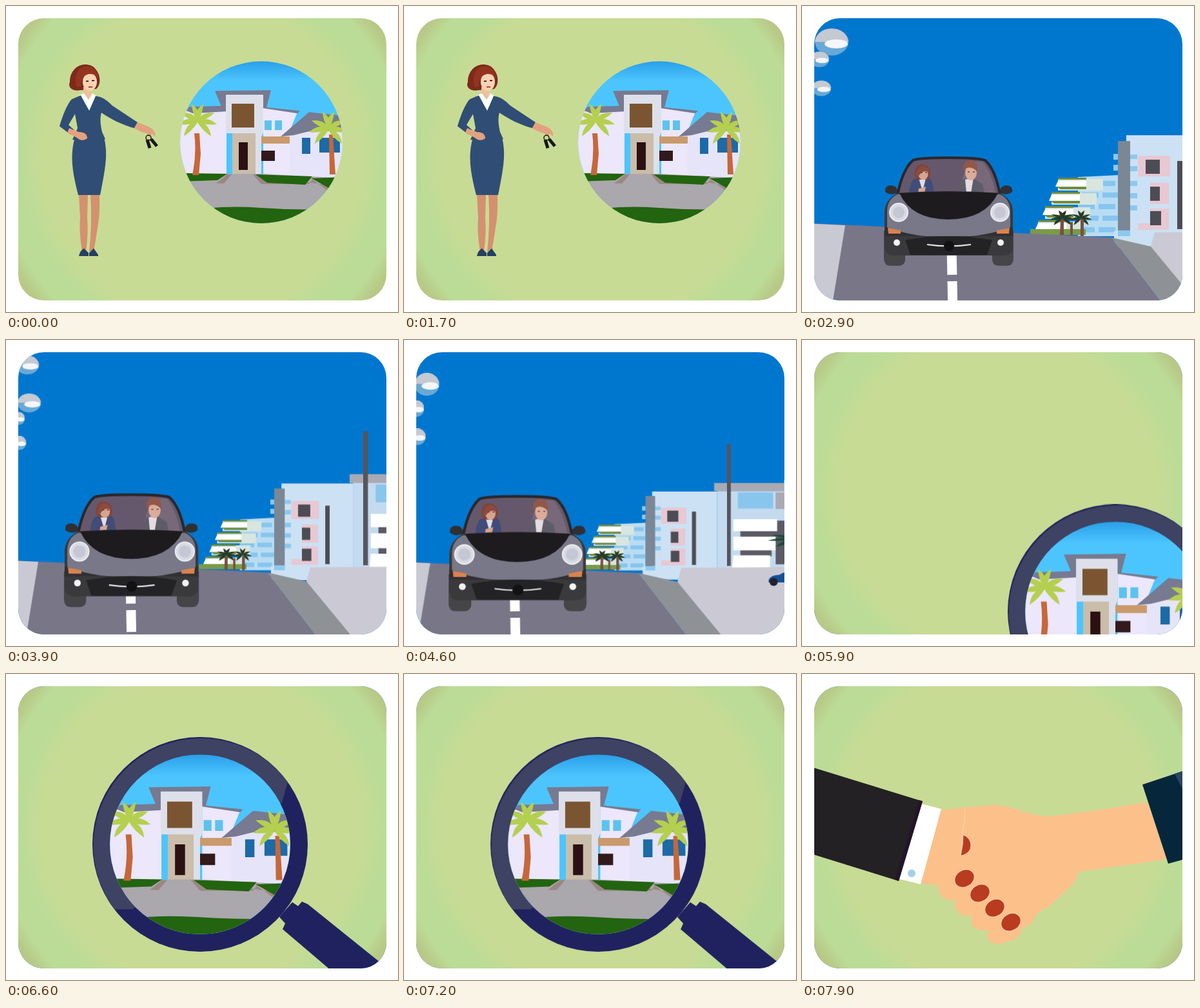
An HTML page that plays this animation: 608 px wide and 476 px high, repeating every 8 s.

```html
<!DOCTYPE html>
<html lang="en">
<head>
<meta charset="utf-8">
<title>House hunting</title>
<style>
html, body { margin: 0; width: 100%; height: 100%; overflow: hidden; background: #fff; }
.stage { position: absolute; left: 0; top: 0; width: 608px; height: 476px; clip-path: inset(19px 18px 18px 19px round 40px); }
.scene, svg { position: absolute; left: 0; top: 0; width: 608px; height: 476px; }
.green { background: radial-gradient(circle 370px at 304px 238px, #c8db94 0 66%, #bbdc97 76% 85%, #b9c987 91%, #b6c083); }
.blue { background: #0077cf; }
.white { background: #fff; }

/* every moving part shares one 8 s clock */
.scene, .move { animation: 8s linear infinite; }
.w1 { animation-name: w1; }
.drive { animation-name: drive; }
.w2 { animation-name: w2; }
.deal { animation-name: deal; }
.car { animation-name: car; }
.city { animation-name: city; }
.road { animation-name: road; }
.lane { animation-name: lane; }
.dash { animation-name: dash; }
.l1 { animation-name: l1; }
.l2 { animation-name: l2; }
.l3 { animation-name: l3; }
.l4 { animation-name: l4; }
.l5 { animation-name: l5; }
.lens { animation-name: lens; }
.left { animation-name: left; }
.right { animation-name: right; }

/* iris wipes: a white disc, then the next scene inside it */
.w1, .w2, .drive, .deal { --in: cubic-bezier(.333, 0, .667, .333); }
@keyframes w1 {
  0%, 25.875% { clip-path: circle(0 at 303px 237px); animation-timing-function: var(--in); }
  32.02%, 100% { clip-path: circle(370px at 303px 237px); }
}
@keyframes drive {
  0%, 27.125% { clip-path: circle(0 at 303px 237px); animation-timing-function: cubic-bezier(.333, 0, .667, .333); }
  33.27%, 100% { clip-path: circle(370px at 303px 237px); }
}
@keyframes w2 {
  0%, 63.375% { clip-path: circle(0 at 303px 237px); animation-timing-function: cubic-bezier(.333, 0, .667, .333); }
  69.52%, 100% { clip-path: circle(370px at 303px 237px); }
}
@keyframes deal {
  0%, 64.625% { clip-path: circle(0 at 303px 237px); animation-timing-function: cubic-bezier(.333, 0, .667, .333); }
  70.77%, 100% { clip-path: circle(370px at 303px 237px); }
}

/* the drive slows down along one shared curve */
@keyframes car {
  0%, 25.875% { transform: translate(260.4px, 230.5px) scale(.958); animation-timing-function: cubic-bezier(.333, .496, .667, .829); }
  71.25%, 100% { transform: translate(154.4px, 244.9px) scale(1.091); }
}
@keyframes city {
  0%, 25.875% { transform: translate(564.8px, 376px) scale(1.1415); animation-timing-function: cubic-bezier(.333, .496, .667, .829); }
  71.25%, 100% { transform: translate(327.2px, 369.6px) scale(.692); }
}
@keyframes road {
  0%, 25.875% { transform: translate(75.8px, -1.5px); animation-timing-function: cubic-bezier(.333, .496, .667, .829); }
  71.25%, 100% { transform: translate(-165px, 3.3px); }
}
@keyframes lane {
  0%, 25.875% { transform: translate(39.4px, 0); animation-timing-function: cubic-bezier(.333, .496, .667, .829); }
  71.25%, 100% { transform: translate(-85.8px, 0); }
}
.path { animation-name: path; }
@keyframes path {
  0%, 25.875% { transform: translate(17.2px, -4px); animation-timing-function: cubic-bezier(.333, .496, .667, .829); }
  71.25%, 100% { transform: translate(-37.4px, 8.8px); }
}
@keyframes dash { to { stroke-dashoffset: -640px; } }

@keyframes l1 {
  0%, 25.875% { transform: translate(34px, 90px) scale(.7); }
  36.25% { transform: translate(46px, 56px) scale(1); }
  48.75%, 100% { transform: translate(70px, -30px) scale(1.4); }
}
@keyframes l2 {
  0%, 25.875% { transform: translate(22px, 110px) scale(.45); }
  36.25% { transform: translate(27px, 83px) scale(.58); }
  48.75% { transform: translate(33px, 39px) scale(.7); }
  66.25%, 100% { transform: translate(36px, -30px) scale(.85); }
}
@keyframes l3 {
  0%, 25.875% { transform: translate(25px, 150px) scale(.5); }
  36.25% { transform: translate(30px, 128px) scale(.58); }
  48.75% { transform: translate(36px, 98px) scale(.7); }
  66.25% { transform: translate(35px, 40px) scale(.78, 1); }
  72%, 100% { transform: translate(38px, 15px) scale(.85, 1); }
}
@keyframes l4 {
  0%, 36.25% { transform: translate(8px, 140px) scale(.3); }
  48.75% { transform: translate(20px, 122px) scale(.36, .48); }
  66.25%, 100% { transform: translate(19px, 91px) scale(.55, .75); }
}
@keyframes l5 {
  0%, 36.25% { transform: translate(8px, 172px) scale(.3); }
  48.75% { transform: translate(21px, 160px) scale(.4, .52); }
  66.25%, 100% { transform: translate(21px, 141px) scale(.58, .72); }
}

@keyframes lens {
  0%, 70% { transform: translate(470px, 400px); animation-timing-function: ease-out; }
  78.75%, 90% { transform: none; animation-timing-function: ease-in; }
  94%, 100% { transform: translate(470px, 400px); }
}
@keyframes left {
  0%, 92% { transform: translate(-420px, 0); animation-timing-function: ease-out; }
  97.5%, 100% { transform: none; }
}
@keyframes right {
  0%, 92% { transform: translate(420px, 0); animation-timing-function: ease-out; }
  97.5%, 100% { transform: none; }
}
</style>
</head>
<body>
<div class="stage">

<div class="scene green">
<svg viewBox="0 0 608 476">
  <defs>
    <clipPath id="round"><circle cx="396" cy="212" r="126"/></clipPath>
    <linearGradient id="sky" x2="0" y2="1">
      <stop stop-color="#2a9fe8"/><stop offset=".12" stop-color="#4cc5ff"/><stop offset="1" stop-color="#4cc5ff"/>
    </linearGradient>
    <path id="leaf" d="M0 0Q13-12 30 3Q14 5 0 0Z"/>
    <g id="half">
      <use href="#leaf" transform="rotate(-78)"/><use href="#leaf" transform="rotate(-35)"/>
      <use href="#leaf"/><use href="#leaf" transform="rotate(40)"/>
    </g>
    <g id="fronds"><use href="#half"/><use href="#half" transform="scale(-1 1)"/></g>

    <g id="house" clip-path="url(#round)">
      <path fill="url(#sky)" d="M270 86H522V338H270Z"/>
      <path fill="#ece7fb" d="M270 164L342 160V264H270ZM399 157L452 165 441 192V264H399Z"/>
      <path fill="#777a90" d="M284 157L342 155V164L290 167 280 163ZM399 157L456 163 452 167 399 159Z"/>
      <path fill="#777a90" d="M324 132L411 131 404 158H399V140H341V158L334 156Z"/>
      <path fill="#dde0ea" d="M341 138H399V197L396 204V263H351V198H341Z"/>
      <path fill="#7b5531" d="M350 152H385V189H350Z"/>
      <path fill="#cabda9" d="M351 198H387V262H351Z"/>
      <path fill="#2c1012" d="M361 212H375V255H361Z"/>
      <path fill="#5cc3ee" d="M401 178H412V193H401ZM417 178H428V193H417Z"/>
      <path fill="#c99a6c" d="M396 203H441V214H396Z"/>
      <path fill="#32191c" d="M396 225H417V241H396Z"/>
      <path fill="#e6e4f8" d="M440 199L522 188V268H440Z"/>
      <path fill="#777a90" d="M426 203L470 165 524 171V196L478 193 446 201Z"/>
      <path fill="#1c6aa6" d="M459 205H472V230H459ZM486 205H518V228H486Z"/>
      <path fill="#aaa7ad" d="M270 262L396 261 522 268V338H270Z"/>
      <path fill="#9b8782" d="M350 262H343L326 276H338ZM387 262H383L396 277H470L478 266 473 268 500 288 508 280Z"/>
      <path fill="#22640f" d="M270 260L343 261 328 271 272 273ZM387 262L475 265 464 278 405 275ZM474 268L522 266V285L502 284ZM270 322Q320 309 396 314T522 314V338H270Z"/>
      <path fill="#c5673a" d="M292 198H300L302 230 299 263H289Q296 230 292 198ZM501 200H507L511 262H502Z"/>
      <g fill="#b5cf50">
        <use href="#fronds" transform="translate(297 181)"/>
        <use href="#fronds" transform="translate(500 193)"/>
      </g>
    </g>
  </defs>
  <use href="#house"/>

  <path fill="#d5906f" d="M113 293H127L126 330Q128 352 124 382H118Q113 350 115 330ZM131 293H145Q146 325 142 345 139 365 136 382H129Q134 340 131 293Z"/>
  <path fill="#263f61" d="M113 389Q115 380 121 377L128 384V389ZM129 389V384L136 377 143 387V389Z"/>
  <path fill="#304d75" d="M107 204H152C158 230 155 248 146 294H112C104 262 98 235 107 204Z"/>
  <path fill="#7d2a1c" d="M122 91C106 92 99 106 99 118 95 127 104 133 115 131L140 129C148 122 146 108 141 101 136 93 130 91 122 91Z"/>
  <path fill="#f0bf9d" d="M120 126H132V145H120Z"/>
  <ellipse fill="#f9d3b4" cx="130" cy="118" rx="11" ry="14"/>
  <path fill="#943320" d="M116 125C117 109 124 107 128 106 136 105 139 108 143 114 143 98 132 93 124 94 109 95 105 113 110 127Z"/>
  <path stroke="#4a2b22" stroke-width="2" d="M124 117H128M133 116H137"/>
  <path stroke="#c83a35" stroke-width="2" d="M128 126H134"/>
  <path fill="#fff" d="M113 139L121 136 128 146 134 136 140 140 130 163Z"/>
  <path fill="#304d75" d="M116 139L129 163 139 140C150 141 158 148 165 155L204 181 199 190C180 185 163 176 148 166 145 176 147 186 149 196L154 207Q130 210 103 208L111 190 107 168 97 185 106 193 100 200 83 187C88 170 95 152 102 145Z"/>
  <path fill="#e3a27f" d="M98 190L113 196Q126 196 126 206 118 212 110 205L95 197ZM204 181L222 188Q233 194 231 203L226 198 224 205 218 198Q208 196 199 190Z"/>
  <g fill="none" stroke="#171717">
    <circle cx="221" cy="205" r="4" stroke-width="1.5"/>
    <path stroke-width="5" d="M219 208L223 221M225 207L234 218"/>
  </g>
</svg>
</div>

<div class="scene white w1"></div>

<div class="scene blue drive">
<svg viewBox="0 0 608 476">
  <defs>
    <g id="lamp">
      <path fill="#c4c9d2" d="M-26 0A26 21 0 0 1 26 0Z"/>
      <path fill="#69a9d6" d="M-26 0A26 21 0 0 0 26 0Z"/>
      <ellipse fill="#f4f6fa" cx="7" cy="3" rx="18" ry="7"/>
    </g>
    <g id="slab">
      <path fill="#d8e6df" d="M0 2H70V20H0Z"/><path fill="#fff" d="M0 5H44V14H-4Z"/><path fill="#6e8b40" d="M0 0H44V3H0ZM-2 14H44V18H4Z"/>
    </g>
    <g id="light">
      <circle r="14" fill="#d9dae2"/><circle r="9" fill="#c5c7d5"/><circle r="14" fill="none" stroke="#efeff4" stroke-width="2"/>
    </g>
  </defs>

  <use class="move l1" href="#lamp"/><use class="move l2" href="#lamp"/><use class="move l3" href="#lamp"/>
  <use class="move l4" href="#lamp"/><use class="move l5" href="#lamp"/>

  <g class="move city"><g transform="translate(-490 -374)">
    <path fill="#b9dcf3" d="M428 266L490 263V358H428Z"/>
    <path stroke="#86c6ef" stroke-width="8" stroke-dasharray="26 6" d="M428 276H490M434 294H490M428 312H490M434 330H490M428 348H490"/>
    <use href="#slab" x="397" y="267"/><use href="#slab" x="387" y="289"/>
    <use href="#slab" x="377" y="311"/><use href="#slab" x="366" y="333"/>
    <path fill="#7a9a48" d="M354 347H440V356H354Z"/>
    <path fill="#cce1f4" d="M503 201H632V376H484V350H503Z"/>
    <path fill="#8bc9f0" d="M483 230H490V239H483ZM483 247H490V256H483ZM509 231H520V238H509ZM509 249H520V257H509ZM509 272H520V280H509ZM509 291H520V299H509ZM509 310H520V318H509ZM490 349H509V358H490Z"/>
    <path fill="#7c8795" d="M490 210H509V349H490Z"/>
    <path fill="#e7c8d3" d="M521 233H571V265H521ZM540 275H569V308H540ZM540 315H569V348H521V338H540Z"/>
    <path fill="#4d4c55" d="M533 239H555V261H533ZM540 281H555V303H540ZM540 319H557V341H540ZM582 241H590V347H582Z"/>
    <path fill="#c3daef" d="M632 200H790V365H632Z"/>
    <path fill="#a9aab3" d="M626 184H787V200H626ZM748 203H790V236H748Z"/>
    <path fill="#89c6ee" d="M673 203H743V235H673Z"/>
    <path fill="#a8d5f2" d="M765 178H880V263H790V200H765Z"/>
    <path fill="#5eb0e4" d="M790 180H810V214H790ZM825 180H850V214H825Z"/>
    <path fill="#f0e5d2" d="M787 218H880V365H787Z"/>
    <path fill="#a8655b" d="M815 240H834V252H815ZM815 275H834V288H815ZM815 322H834V337H815Z"/>
    <path fill="#5c5a64" d="M748 259H776V346H748ZM678 278H748V294H678ZM678 316H740V330H678Z"/>
    <path fill="#fff" d="M664 256H751V280H664ZM664 291H748V318H664ZM664 328H737V361H661Z"/>
    <g fill="#263a26">
      <use href="#fronds" transform="translate(404 331) scale(.65 .45)"/>
      <use href="#fronds" transform="translate(433 331) scale(.55 .45)"/>
    </g>
    <path fill="#78503f" d="M401 332H406V357H400ZM416 336H420V358H416ZM432 332H437V358H432Z"/>
  </g></g>

  <g class="move road">
    <path fill="#797688" d="M-100 332.5L480 360 555 458 560 480H-100Z"/>
    <path fill="#cbcad4" d="M541 374L547 352 860 350V480H600Z"/>
    <path fill="#8e9296" d="M480 360L541 374 620 470V480H572Z"/>
  </g>
  <g class="move city"><g transform="translate(-490 -374)">
    <path fill="#56545d" d="M651 107H659V349H651Z"/>
    <path fill="#164f94" d="M734 378Q736 368 755 367 768 358 790 360 810 360 824 368L826 382H734Z"/>
    <circle cx="744" cy="381" r="8" fill="#20232f"/><circle cx="806" cy="381" r="8" fill="#20232f"/>
    <path fill="#7d4d3e" d="M765 325Q765 307 772 307T781 325L776 345V391H768V345Z"/>
    <use href="#fronds" fill="#1d4b3c" transform="translate(792 297) scale(2 .65)"/>
  </g></g>
  <path class="move path" fill="#c9c9d3" d="M-60 335L67 341 48 458 44 480H-60Z"/>
  <g class="move lane">
    <path class="move dash" fill="none" stroke="#fff" stroke-width="15" stroke-dasharray="34 10" d="M232 372L234 480"/>
  </g>

  <g class="move car"><g transform="translate(-227 -235)">
    <path fill="#454548" d="M127 350H160V396Q158 404 150 404H137Q128 404 127 394ZM295 350H328V394Q327 404 318 404H305Q297 404 295 396Z"/>
    <path fill="#303033" d="M129 289Q128 279 138 279 147 279 149 290 138 296 129 289ZM326 289Q327 279 317 279 308 279 306 290 317 296 326 289Z"/>
    <path fill="#66586c" stroke="#29272b" stroke-width="4" d="M148 294Q156 254 172 240 180 236 227 236T284 240Q300 254 307 294Z"/>
    <path fill="#77697a" d="M246 290Q247 256 264 242H280Q294 259 300 290Z"/>
    <path fill="#414d78" d="M166 291Q168 267 179 268L194 266Q204 268 204 291Z"/>
    <path fill="#e3dde3" d="M181 268H192L187 288Z"/>
    <path fill="#81443a" d="M175 265Q173 247 186 246 200 247 199 263L195 270H180Z"/>
    <ellipse fill="#d6a592" cx="188" cy="261" rx="7.5" ry="9.5"/>
    <path fill="#8b4b3e" d="M177 264Q178 250 188 249 196 249 198 260 188 252 180 266Z"/>
    <path fill="#d6a592" d="M181 284L192 281 190 291H180Z"/>
    <path fill="#5f5c69" d="M243 291L249 270 264 267 280 277 283 291Z"/>
    <path fill="#e3dde3" d="M253 270L266 267 262 291H255Z"/>
    <circle fill="#91584a" cx="261" cy="251" r="11"/>
    <ellipse fill="#dbac99" cx="262" cy="259" rx="9" ry="12"/>
    <path fill="#91584a" d="M250 255Q254 242 264 243 272 245 272 258 262 246 250 255Z"/>
    <path stroke="#66433f" stroke-width="1.5" d="M184 259H187M191 259H194M257 258H260M265 258H268"/>
    <path fill="#3a393c" d="M148 291Q227 285 307 291 327 301 327 320V375Q326 388 312 388H143Q129 388 128 375V320Q129 301 148 291Z"/>
    <path fill="#787888" d="M148 293Q132 300 132 320V346Q180 360 227 360T323 346V320Q323 300 307 293Z"/>
    <path fill="#1d1b1e" d="M151 291Q227 286 304 291 284 332 227 332T151 291Z"/>
    <path fill="#303033" d="M128 343Q180 362 227 362T327 343V358H128Z"/>
    <path fill="#232225" d="M160 364Q227 352 295 364L287 387H168Z"/>
    <use href="#light" x="150" y="321"/><use href="#light" x="307" y="321"/>
    <path fill="#dc824d" d="M133 345L153 349V354H134ZM322 345L302 349V354H321Z"/>
    <circle cx="147" cy="368" r="5" fill="#f3f3f6"/><circle cx="308" cy="368" r="5" fill="#f3f3f6"/>
    <path fill="none" stroke="#e7e7ed" stroke-width="2" d="M194 371Q228 376 262 371"/>
    <circle cx="228" cy="373" r="8" fill="#121215"/>
  </g></g>
</svg>
</div>

<div class="scene white w2"></div>

<div class="scene green deal">
<svg viewBox="0 0 608 476">
  <g class="move lens">
    <path fill="#20225f" d="M424 378L444 355 453 361 459 354 468 358 660 513 620 560 429 397 433 388Z"/>
    <circle cx="301" cy="265" r="167" fill="#20225f"/>
    <path fill="#3e4263" d="M437 168A167 167 0 0 0 168 366L196 366 428 200Z"/>
    <use href="#house" transform="translate(301 265) scale(1.11) translate(-396 -212)"/>
  </g>
  <g class="move left">
    <path fill="#fcc08b" d="M214 212Q260 206 300 204L345 215 385 240 350 340 290 370 214 330 184 325Z"/>
    <path fill="#fff" d="M186 202L216 210 184 327 151 319Z"/>
    <path fill="#232123" d="M-20 134L187 198 150 322-20 269Z"/>
    <path fill="#24142a" d="M182 196L187 198 150 322 144 320Z"/>
    <circle cx="170" cy="310" r="6" fill="#a5d0e9"/>
  </g>
  <g class="move right">
    <path fill="#fcc08b" d="M248 209L300 204Q325 206 345 215L378 222Q460 213 536 199L566 288 428 308Q427 322 415 332L381 363 363 373Q358 392 342 394 336 416 319 415 304 424 292 416 286 411 289 399 270 400 264 391 262 385 263 376 245 377 239 367 236 361 238 352 222 353 215 344 211 338 212 329L225 285Z"/>
    <path fill="none" stroke="#f9d4ae" d="M252 211Q254 224 250 240L246 278"/>
    <g fill="#b93b20" stroke="#f7d2b2">
      <path d="M250 250Q262 255 262 267T246 283Q250 266 250 250Z"/>
      <ellipse rx="16" ry="13" transform="translate(252 318) rotate(-32)"/>
      <ellipse rx="16" ry="13" transform="translate(276 341) rotate(-32)"/>
      <ellipse rx="16" ry="13" transform="translate(299 364) rotate(-32)"/>
      <ellipse rx="16" ry="13" transform="translate(324 386) rotate(-32)"/>
    </g>
    <path fill="#06263b" d="M528 172L630 138V278L568 295Z"/>
    <path fill="#2b4560" d="M578 155L630 138V260Z"/>
  </g>
</svg>
</div>

</div>
</body>
</html>
```
